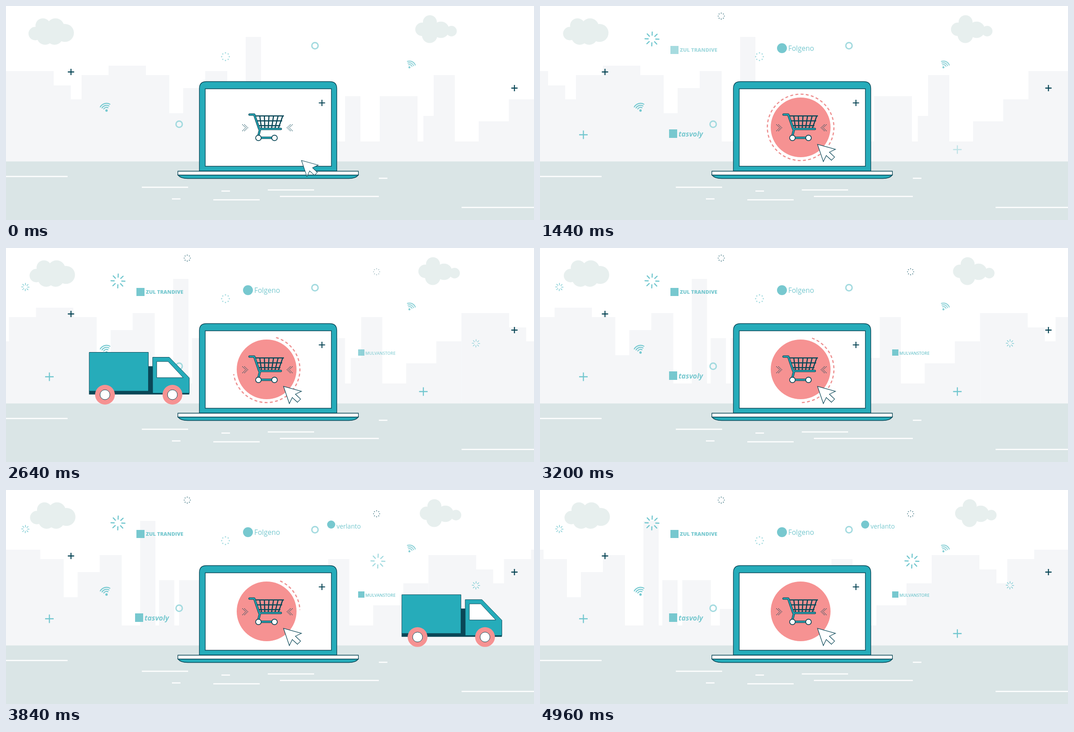
Recreate the animation shown at these times as an HTML page. Size 1174x477 px, loop 5000 ms.

```html
<!DOCTYPE html>
<html lang="en">
<head>
<meta charset="utf-8">
<title>Online shop delivery</title>
<style>
html, body { margin: 0; width: 100%; height: 100%; overflow: hidden; background: #fff; }
svg { display: block; width: 1174px; height: 477px; }
.dark { stroke: #0a4757; }
.teal { fill: #26acba; }
.line { fill: none; stroke-linecap: round; stroke-linejoin: round; }
.logo { fill: #77c8cf; font-family: "Open Sans", sans-serif; }
</style>
</head>
<body>
<svg viewBox="0 0 1174 477" xmlns="http://www.w3.org/2000/svg">
  <defs>
    <mask id="sweep" maskUnits="userSpaceOnUse" x="-90" y="-90" width="180" height="180">
      <circle id="arc" r="74" pathLength="360" fill="none" stroke="#fff" stroke-width="8"/>
    </mask>
    <path id="skyline" d="M0 347V145H106V177H144V208H168V154H228V133H311V154H363V239H394V183H443V145H492V302
      H533V69H567V302H575V201H609V302H619.5V201H683V302H703V265H736V302H754V201H788V302H831V201H915V302
      H928V245H951V154H998V302H1051V257H1118V208H1174V347z"/>
  </defs>

  <g id="city" fill="#f5f6f8">
    <use href="#skyline"/>
    <use href="#skyline" x="1174"/>
  </g>
  <g id="cloudA" fill="#e7efee">
    <circle cx="65" cy="61.5" r="15"/>
    <circle cx="82" cy="44" r="16.5"/>
    <circle cx="110" cy="47" r="19.5"/>
    <circle cx="131" cy="60" r="20"/>
    <circle cx="108" cy="68" r="18.5"/>
    <circle cx="87" cy="68" r="18.5"/>
  </g>
  <g id="cloudB" fill="#e7efee">
    <circle cx="925" cy="52" r="15"/>
    <circle cx="942.5" cy="36" r="15.5"/>
    <circle cx="942" cy="65.5" r="17"/>
    <circle cx="967" cy="53" r="18.3"/>
    <circle cx="990.5" cy="56" r="11.8"/>
  </g>
  <path fill="#dae5e6" d="M0 346.5H1174V477H0z"/>
  <path stroke="#fff" stroke-width="2.6" d="M0 380h137M302 404h103M461 432h103M582 410h103M609 424.5h220
    M1013 449h161M479 412.5h19M369 430h19M829 384h19"/>
  <g id="decor"></g>

  <g class="logo">
    <g data-in="240">
      <circle cx="538" cy="94" r="11"/>
      <text x="552" y="100" font-size="15.5">Folgeno</text>
    </g>
    <g data-in="765">
      <rect x="287" y="275" width="18" height="19"/>
      <text x="308" y="291" font-size="16" font-weight="700" font-style="italic">tasvoly</text>
    </g>
    <g data-in="1180">
      <rect x="290" y="89" width="18" height="18"/>
      <text x="311" y="102" font-size="11.3" font-weight="800">ZUL TRANDIVE</text>
    </g>
    <g data-in="2320">
      <rect x="783" y="226" width="14" height="14"/>
      <text x="799" y="237.5" font-size="9.2" font-weight="600">MULVANSTORE</text>
    </g>
    <g data-in="3420">
      <circle cx="723" cy="77" r="9"/>
      <text x="735" y="86" font-size="14">verlanto</text>
    </g>
  </g>

  <g id="truck">
    <path fill="#0a4757" d="M0 86H223V94H0zM131 31H142V94H131z"/>
    <g class="teal dark" stroke-width="1">
      <path d="M.5 0H132V86.5H.5z"/>
      <path d="M141.5 11H178.5L223 57V91H141.5z"/>
      <path fill="#fff" d="M150.5 20.5H176L209.5 56.5H150.5z"/>
    </g>
    <g id="wheels"></g>
  </g>

  <g class="dark" stroke-width="1.4">
    <path class="teal" d="M430 368V184Q430 168.5 445.5 168.5H720Q735.5 168.5 735.5 184V368z"/>
    <path fill="#fff" d="M443 184.5H723.5V357.3H443z"/>
    <path class="teal" d="M382.2 376.5H783.5Q778 384.5 762 384.5H404Q388 384.5 382.2 376.5z"/>
    <path fill="#fff" d="M382.2 368.2H783.5V376.8H382.2z"/>
  </g>

  <g transform="translate(579.5 270.5)">
    <g id="ring" mask="url(#sweep)">
      <circle r="74" pathLength="360" fill="none" stroke="#ee9090" stroke-width="2.6" stroke-dasharray="5 4"/>
    </g>
    <circle id="disc" fill="#f69292"/>
  </g>
  <g id="chevrons" fill="#0a4757"></g>

  <g class="line dark">
    <path id="basket" stroke-width="2.5" stroke-linecap="butt"/>
    <path id="frame" stroke-width="5" d="M541.5 242H552L563 274H611M564.5 276L561 290M563 293.7H595"/>
    <path id="frameFill" stroke="#26acba" stroke-width="2.4"/>
    <g fill="#fff" stroke-width="1.7">
      <circle cx="561.3" cy="294" r="6.2"/>
      <circle cx="597" cy="294" r="6.2"/>
    </g>
  </g>
  <path class="dark" stroke-width="2.2" d="M695.5 216H709.5M702.5 209V223"/>
  <path id="pointer" class="dark" fill="#fff" stroke-width="1.2"
    d="M0 0L40 11L26.5 17.5L38 28.5L31 35.5L19.5 25L13 38.5z"/>
</svg>

<script>
const LOOP = 5000, FADE = 400;
const DARK = '#0a4757', AQUA = '#70c6ce', PALE = '#a2dadf';
const $ = id => document.getElementById(id);
const add = (parent, tag, attrs) => {
  const el = document.createElementNS('http://www.w3.org/2000/svg', tag);
  for (const k in attrs) el.setAttribute(k, attrs[k]);
  parent.appendChild(el);
  return el;
};
const part = (t, a, b) => Math.max(0, Math.min(1, (t - a) / (b - a)));
const ease = p => (1 - Math.cos(Math.PI * p)) / 2;
const polar = (r, deg) => {
  const a = deg * Math.PI / 180;
  return [r * Math.cos(a), r * Math.sin(a)];
};
const range = n => [...Array(n).keys()];

// Small floating signs; start is the time the sign fades in
const sign = (x, y, start) => {
  const g = add($('decor'), 'g', { transform: `translate(${x} ${y})`, class: 'line' });
  if (start) g.dataset.in = start;
  return g;
};
const plus = (x, y, r, stroke, start) => add(sign(x, y, start), 'path',
  { d: `M${-r} 0H${r}M0 ${-r}V${r}`, stroke, 'stroke-width': 2.3, 'stroke-linecap': 'butt' });
const hoop = (x, y) => add(sign(x, y), 'circle', { r: 7, stroke: PALE, 'stroke-width': 3 });
const dotRing = (x, y, r, fill, start) => {
  const g = sign(x, y, start);
  for (const i of range(8)) {
    const [cx, cy] = polar(r, i * 45);
    add(g, 'circle', { cx, cy, r: r / 6, fill });
  }
};
const burst = (x, y, r, start) => add(sign(x, y, start), 'path', {
  d: range(8).map(i => `M${polar(r * .54, i * 45 + 2)}L${polar(r, i * 45 + 2)}`).join(''),
  stroke: AQUA, 'stroke-width': r * .155
});
const wifi = (x, y, dir, size, color) => {
  const g = sign(x, y);
  add(g, 'circle', { r: size / 6, fill: color });
  for (const i of range(3)) {
    const r = size * (1 - i * .28);
    add(g, 'path', {
      d: `M${polar(r, dir - 44)}A${r} ${r} 0 0 1 ${polar(r, dir + 44)}`,
      stroke: color, 'stroke-width': size * .14
    });
  }
};

plus(144.5, 147, 7, DARK);
plus(1130.5, 183, 7, DARK);
plus(96.5, 287, 9.5, AQUA, 160);
plus(928, 320, 9.5, AQUA, 1280);
hoop(687, 88.5);
hoop(385, 263.5);
wifi(223.5, 233, 254, 16, '#75c9d0');
wifi(897, 136.7, 295, 14, '#8ad0d6');
dotRing(488, 113, 8.5, PALE);
dotRing(403, 22.5, 6.7, '#4d7f8b', 580);
dotRing(824, 53, 6.7, '#4d7f8b', 2440);
burst(249, 73.5, 15.5, 240);
burst(827, 158.5, 15.5, 3580);
burst(43, 87, 8.6, 1720);
burst(1045, 212.5, 8.6, 2320);

// Dotted chevrons beside the cart
for (const side of [-1, 1])
  for (const shift of [0, 4.4])
    for (const row of range(7)) {
      const i = row - 3;
      add($('chevrons'), 'circle', {
        cx: 581.3 + side * (43.8 + shift + Math.abs(i) * 2.3), cy: 271.3 + i * 2.25, r: .85
      });
    }

$('basket').setAttribute('d', 'M555 245H618M558 256H614M562 266.8H610' +
  range(6).map(i => `M${564.3 + 10.2 * i} 245L${568 + 7.5 * i} 273`).join(''));
$('frameFill').setAttribute('d', $('frame').getAttribute('d'));

for (const cx of [35.5, 185.5]) {
  add($('wheels'), 'circle', { cx, cy: 94.5, r: 22, fill: '#f69292' });
  add($('wheels'), 'circle', { cx, cy: 94.5, r: 11, fill: '#fff', class: 'dark' });
}

const fades = [...document.querySelectorAll('[data-in]')];
const move = (id, value) => $(id).setAttribute('transform', value);

function draw(t) {
  move('city', `translate(${-.0611 * t} 0)`);
  move('cloudA', `translate(${.0009 * t} 0)`);
  move('cloudB', `translate(${.0026 * t} 0)`);

  for (const el of fades) {
    const start = +el.dataset.in;
    el.setAttribute('opacity', part(t, start, start + FADE));
  }

  // The truck speeds up slightly and shakes on the road
  const d = t - 2640;
  const shake = -Math.cos(d / 373 * 2 * Math.PI);
  move('truck', `translate(${184 + .5757 * d + 2.9e-6 * d * d} ${233.5 + shake})`);

  const sweep = 360 * (t < 1500 ? part(t, 240, 740) : 1 - part(t, 1882, 4262));
  $('arc').setAttribute('stroke-dasharray', `${sweep} 400`);
  $('ring').setAttribute('visibility', sweep > 0 ? 'visible' : 'hidden');
  move('ring', `rotate(${.0062 * t - 90})`);
  $('disc').setAttribute('r', 66.5 * ease(part(t, 600, 1180)));

  const p = ease(part(t, 520, 1240));
  move('pointer', `translate(${657 - 40 * p} ${344.3 - 36 * p}) scale(${.93 + .07 * p})`);
}

const begin = performance.now();
function tick() {
  draw((performance.now() - begin) % LOOP);
  requestAnimationFrame(tick);
}
draw(0);
requestAnimationFrame(tick);
</script>
</body>
</html>
```
